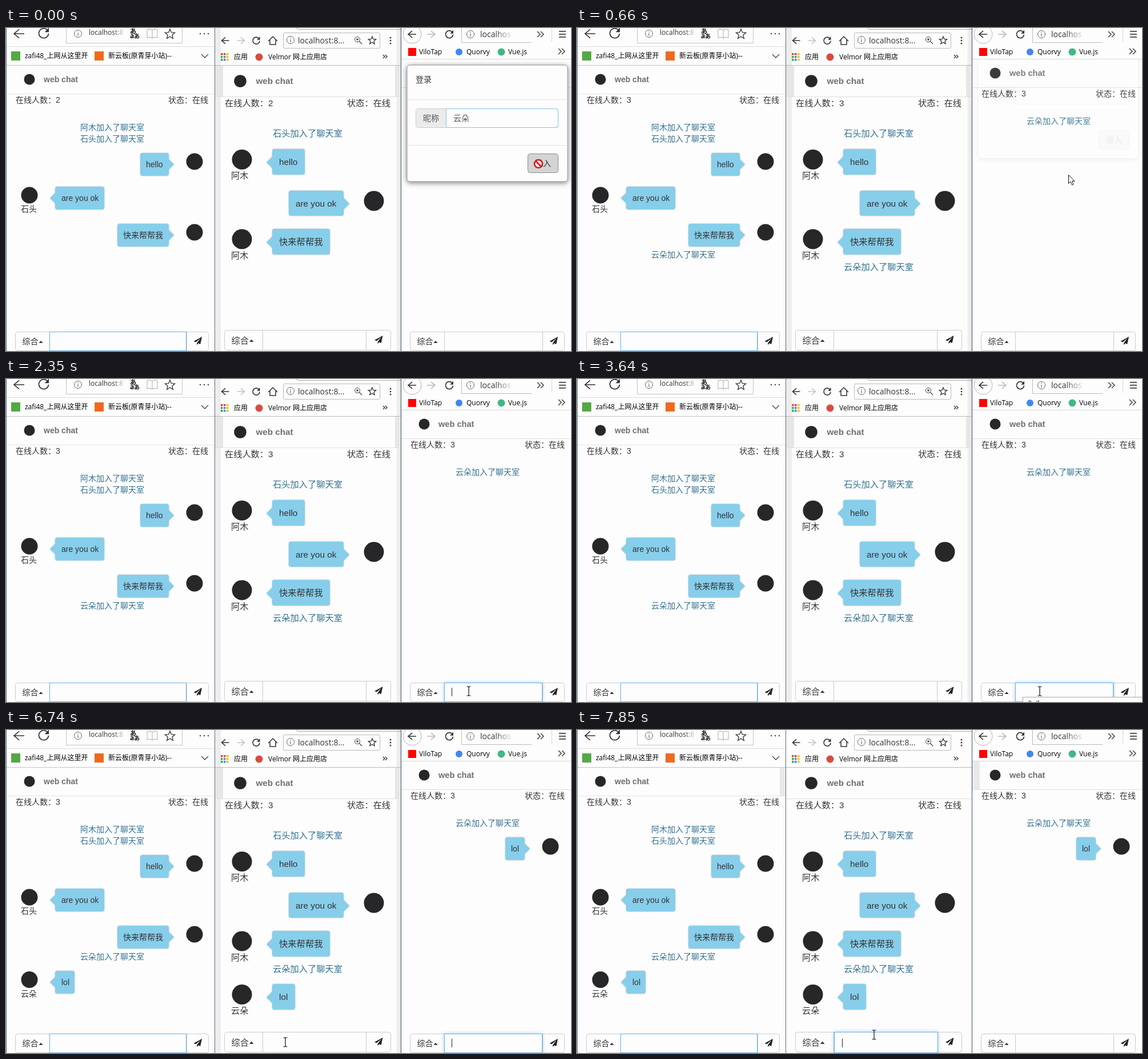
Recreate the animation shown at these times as an HTML page. Size 989 by 566 pixels, loop 8000 ms.

```html
<!DOCTYPE html>
<html lang="zh-CN">
<head>
<meta charset="utf-8">
<title>web chat</title>
<style>
  html, body { margin: 0; width: 100%; height: 100%; overflow: hidden; background: #fdfdfd; }
  svg { display: block; width: 100%; height: 100%; }
  text { font-family: "Liberation Sans", "Noto Sans CJK SC", "Noto Sans CJK", sans-serif; white-space: pre; }
  .ui text { font-family: "Open Sans", "Noto Sans CJK SC", "Noto Sans CJK", sans-serif; }
  .bubble { filter: drop-shadow(0 .5px 1.2px rgba(0,0,0,.28)); }
  .glow { filter: drop-shadow(0 0 3px rgba(102,175,233,.6)); }
  .card { filter: drop-shadow(0 2px 5px rgba(0,0,0,.5)); }
</style>
</head>
<body>
<svg id="stage" viewBox="0 0 989 566">
  <defs>
    <linearGradient id="fade"><stop stop-color="#fdfdfd" stop-opacity="0"/><stop offset="1" stop-color="#fdfdfd"/></linearGradient>
    <linearGradient id="shade"><stop stop-color="#f6f6f6"/><stop offset="1" stop-color="#e2e2e2"/></linearGradient>
    <clipPath id="page"><rect x="692" y="55" width="297" height="511"/></clipPath>
    <clipPath id="tab"><rect x="0" y="34" width="144" height="31"/></clipPath>
  </defs>
</svg>
<script>
const LOOP = 8000;
const INK = '#333', PALE = '#fdfdfd', BLUE = '#66afe9';
const USER = { first: '阿木', second: '石头', third: '云朵' };

// Drawing helpers; all return SVG markup.
const text = (x, y, s, size = 14, fill = INK, extra = '') =>
  `<text x="${x}" y="${y}" font-size="${size}" fill="${fill}" ${extra}>${s}</text>`;
const rect = (x1, y1, x2, y2, fill, stroke = 'none', r = 0, extra = '') =>
  `<rect x="${x1}" y="${y1}" width="${x2 - x1}" height="${y2 - y1}" rx="${r}" fill="${fill}" stroke="${stroke}" ${extra}/>`;
const path = (d, stroke = INK, width = 1.5, fill = 'none') =>
  `<path d="${d}" stroke="${stroke}" stroke-width="${width}" fill="${fill}"/>`;
const disc = (x, y, r, fill = '#272729', stroke = 'none', extra = '') =>
  `<circle cx="${x}" cy="${y}" r="${r}" fill="${fill}" stroke="${stroke}" ${extra}/>`;
const at = (x, y, s) => `<g transform="translate(${x} ${y})">${s}</g>`;
const group = (id, s) => `<g id="${id}">${s}</g>`;
const hLine = (x1, x2, y, color) => rect(x1, y, x2, y + 1, color);
const vLine = (x, color, y1 = 0, y2 = 566) => rect(x, y1, x + 1, y2, color);
const bookmark = (x, y, s) => text(x, y, s, 12, '#000');

// Browser icons
const arrow = (x, y, size, color = INK, dir = 1) =>
  at(x, y, path(`M${dir * size} 0H${-dir * size}M0 ${-size * .85}L${-dir * size} 0L0 ${size * .85}`, color, 1.6));
const reload = (x, y, r) =>
  at(x, y, path(`M${r * .7} ${-r * .7}A${r} ${r} 0 1 0 ${r} ${r * .1}`, INK, 1.7) +
    path(`M${r + .5} ${-r - 1}V${-r * .2}H${r * .2}Z`, 'none', 0, INK));
const info = (x, y) => disc(x, y, 6.5, 'none', '#666') + vLine(x - .5, '#555', y - 1, y + 4) + vLine(x - .5, '#555', y - 4, y - 2.5);
const star = (x, y, r) => {
  const points = Array.from({ length: 10 }, (_, i) => {
    const a = i * Math.PI / 5 - Math.PI / 2, d = i % 2 ? r * .45 : r;
    return `${d * Math.cos(a)} ${d * Math.sin(a)}`;
  });
  return at(x, y, path(`M${points.join('L')}Z`, INK, 1.3));
};
const dots = (x, y, dx, dy, r = 1.5) => [-1, 0, 1].map(i => disc(x + i * dx, y + i * dy, r, '#444')).join('');
const guillemet = (x, y, s) => at(x, y, path(`M${-s} ${-s}L0 0L${-s} ${s}M1 ${-s}L${s + 1} 0L1 ${s}`, '#444', 1.5));

// Chat parts
function bubble(x1, y1, x2, y2, side, label, size, pad) {
  const mid = (y1 + y2) / 2, edge = side < 0 ? x1 + 1 : x2 - 1;
  const h = size > 14 ? 11 : 10, tip = edge + side * h, tipY = size > 14 ? mid + 1 : mid;
  return `<g class="bubble">${rect(x1, y1, x2, y2, '#87ceeb', 'none', 4)}` +
    path(`M${edge} ${tipY - h}L${tip} ${tipY}L${edge} ${tipY + h}Z`, 'none', 0, '#87ceeb') + '</g>' +
    text(x1 + pad, mid + size * .36, label, size);
}
const avatar = (x, y, r, name = '', size = 14) =>
  disc(x, y, r) + text(x - size * (size > 14 ? 1.25 : 1.07), y + r + size * 1.06, name, size);
const notice = (x, y, name, size = 14) => text(x, y, name + '加入了聊天室', size, '#31708f');
const header = (x, y, r, textX, size) => disc(x, y, r) + text(textX, y + 5, 'web chat', size, '#6f6f6f', 'font-weight="bold"');
const status = (x1, x2, y, size) =>
  text(x1, y, '在线人数：<tspan class="count">2</tspan>', size) + text(x2, y, '状态：在线', size, INK, 'text-anchor="end"');

function inputBar(x1, x2, x3, x4, y1, y2, size) {
  const mid = (y1 + y2) / 2, label = x1 + 12.5, tri = label + size * 2 + 1, s = size / 14;
  return rect(x1 + .5, y1 + .5, x4 - .5, y2 - .5, PALE, '#ccc', 4) + vLine(x2, '#ccc', y1, y2) + vLine(x3, '#ccc', y1, y2) +
    text(label, mid + size * .37, '综合', size) +
    path(`M${tri} ${mid + 3}l${3.5 * s} ${-4 * s}l${3.5 * s} ${4 * s}Z`, 'none', 0, INK) +
    at((x3 + x4) / 2, mid - 1, path('M7.5-7L-7 1L-3.2 2.6L5-4.5L-1.4 4V7.5L1 4.5L4.7 6Z', 'none', 0, '#222'));
}
const focusBox = (x1, y1, x2, y2, extra = 'class="glow"') => rect(x1 + .5, y1 + .5, x2 - .5, y2 - .5, PALE, BLUE, 0, extra);
const caret = (id, x) => group(id, vLine(x, '#222', 541, 556));

const leftWindow =
  `<g class="ui">${arrow(23, 10, 9)}${reload(66, 9, 8.5)}` +
  path('M105.5 0V26.5H308.5V0', '#c4c4c4', 1) + info(126, 10) + text(145, 12, 'localhost:8', 12) +
  rect(188, 0, 209, 20, 'url(#fade)') +
  text(217, 10, 'あ', 11, '#111', 'font-weight="bold"') + text(224, 18, 'あ', 10, '#111', 'font-weight="bold"') +
  text(217, 18, 'a', 12, '#111', 'font-weight="bold"') +
  path('M256 4V18M247 3Q253 1 256 4Q259 1 265 3V17Q259 15 256 18Q253 15 247 17Z', '#bbb', 1.2) +
  star(287, 11, 9) + dots(347, 10, 7, 0, 1.2) +
  hLine(0, 365, 32, '#dedede') + hLine(0, 365, 65, '#c3c3c3') +
  rect(9, 41, 25, 57, '#55a845') + `<g clip-path="url(#tab)">${bookmark(33, 53, 'zafi48_上网从这里开始')}</g>` +
  rect(155, 41, 171, 57, '#ee6a1f') + bookmark(179, 53, '新云板(原青芽小站)--') +
  path('M342 46L348 52L354 46', '#444', 1.3) + '</g>' +
  header(41, 90, 9.5, 66, 14) + hLine(1, 365, 115, '#e4e4e4') + status(17, 354, 131, 14) +
  notice(130, 179, USER.first) + notice(130, 199, USER.second) +
  bubble(235, 219, 285, 259, 1, 'hello', 14, 10) + avatar(330, 234, 14.5) +
  bubble(86, 278, 172, 318, -1, 'are you ok', 14, 11) + avatar(41, 293, 14.5, USER.second) +
  bubble(195, 343, 285, 383, 1, '快来帮帮我', 14, 10) + avatar(330, 358, 14.5) +
  inputBar(16, 76, 316, 355, 532, 566, 14) + focusBox(76, 532, 316, 566, '');

const APP_COLORS = ['#e94335', '#e94335', '#fbbc05', '#34a853', '#4285f4', '#fbbc05', '#34a853', '#4285f4', '#fbbc05'];
const appGrid = APP_COLORS.map((c, i) => at(376 + i % 3 * 5, 44 + Math.floor(i / 3) * 5, rect(0, 0, 3.5, 3.5, c))).join('');
const middleWindow =
  `<g class="ui">${path('M508 0L511 2.5H691', '#aaa', 1)}` +
  arrow(384, 22, 6.5) + arrow(411, 22, 6.5, '#c4c4c4', -1) + reload(438, 22, 6) +
  path('M459 23L467 15L475 23M462 21V29H472V21', INK, 1.5) +
  rect(485.5, 8.5, 654.5, 35.5, PALE, '#b8b8b8', 2) + info(498, 21) + text(511, 27, 'localhost:8...', 14) +
  disc(615, 20, 4.5, 'none', '#444') + path('M618 23L623 28M613 20H617M615 18V22', '#444', 1.3) +
  star(641, 22, 7) + dots(673, 22, 0, 5) + appGrid + bookmark(399, 55, '应用') +
  disc(443, 51, 6.5, '#d94b3d') + bookmark(459, 55, 'Velmor 网上应用店') + guillemet(663, 50, 3) +
  hLine(366, 691, 65, '#b9b9b9') + '</g>' +
  header(410, 93, 10.8, 437.5, 15.2) + hLine(366, 691, 120, '#e0e0e0') + status(383, 673, 137, 15.2) +
  notice(467, 190, USER.second, 15.25) +
  bubble(466, 212, 523, 257, -1, 'hello', 15.3, 12) + avatar(413, 230.5, 17.5, USER.first, 15.2) +
  bubble(495, 285, 591, 329, 1, 'are you ok', 15.3, 12) + avatar(644, 303, 17.5) +
  bubble(466, 352, 567, 397, -1, '快来帮帮我', 15.3, 12) + avatar(413, 370, 17.5, USER.first, 15.2) +
  inputBar(382, 449, 630, 674, 529, 565, 15.2) + group('middleFocus', focusBox(450, 529, 632, 566)) + caret('middleCaret', 464);

const rightWindow =
  `<g class="ui">${disc(711, 11, 16, PALE, '#b5b5b5')}${arrow(711, 11, 7)}${arrow(744, 11, 7, '#b9b9b9', -1)}${reload(776, 11, 6.5)}` +
  path('M797.5 0V25.5H920', '#bbb', 1) + info(813, 11) + text(830, 16, 'localhos', 14) + rect(855, 2, 889, 24, 'url(#fade)') +
  guillemet(935, 11, 5) + vLine(955, '#d5d5d5', 0, 24) + [5, 10, 15].map(y => rect(968, y, 980, y + 1.6, INK)).join('') +
  rect(704, 35, 718, 49, '#f00') + bookmark(723, 46, 'ViloTap') +
  disc(793, 42, 6, '#4285f4') + bookmark(806, 46, 'Quorvy') +
  disc(867, 42, 6.5, '#41b883') + bookmark(879, 46, 'Vue.js') + guillemet(972, 41, 5) +
  hLine(692, 989, 54, '#d8d8d8') + '</g>' +
  header(732, 79, 9.5, 757, 14.6) + hLine(692, 989, 104, '#e0e0e0') + status(708, 978, 120, 14) + notice(787, 168, USER.third) +
  inputBar(707, 767, 939, 978, 532, 566, 14) + group('rightFocus', focusBox(767, 532, 939, 566)) + caret('rightCaret', 780) +
  group('candidates', rect(780.5, 557.5, 1000, 580, PALE, '#aaa') + text(790, 574, '<tspan id="typed"></tspan>', 14));

const dialog = `<g clip-path="url(#page)"><g id="dialog">
  <g class="card">${rect(702, 65, 983, 269, PALE, '#999', 5)}</g>` +
  text(717, 95, '登录') + hLine(702, 983, 125, '#e2e2e2') + hLine(702, 983, 205, '#e2e2e2') +
  rect(717.5, 141.5, 966.5, 174.5, PALE, '#ccc', 4) + rect(718, 142, 770, 174, '#ebebeb', 'none', 3) +
  vLine(770, '#ccc', 141, 174) + text(730, 163, '昵称', 14, '#555') +
  group('nickname', path('M770.5 141.5H963Q966.5 141.5 966.5 145V171Q966.5 174.5 963 174.5H770.5Z', '#8fbfe6', 1) + text(783, 163, USER.third, 14, '#555')) +
  rect(913.5, 220.5, 966.5, 253.5, '#e6e6e6', '#adadad', 4, 'id="enter"') + text(926, 242, '进入') + '</g></g>';

const joined = notice(130, 402, USER.third) + notice(467, 424, USER.third, 15.25);
const reply =
  bubble(86, 422, 120, 462, -1, 'lol', 14, 11) + avatar(41, 437.5, 14.5, USER.third) +
  bubble(466, 445, 506, 490, -1, 'lol', 15.3, 12) + avatar(413, 463.5, 17.5, USER.third, 15.2) +
  bubble(874, 188, 908, 228, 1, 'lol', 14, 10) + avatar(953, 204, 14.5);

// Window shadows depend on which window is in front.
const rightInFront = rect(366, 0, 376, 566, '#ededed') + rect(683, 0, 691, 566, 'url(#shade)') +
  rect(366, 66, 380, 120, '#e6e6e6') + rect(681, 66, 691, 120, '#e6e6e6');
const middleInFront = rect(355, 66, 365, 115, '#e9e9e9') + rect(692, 55, 705, 104, '#e9e9e9');

const pointers =
  group('blocked', disc(932, 238, 7, '#fff', '#d8141c', 'stroke-width="2.6"') + path('M927 233L937 243', '#d8141c', 2.6)) +
  group('pointer', path('M.5 .5V15.5L4 12.3L6.5 18L9 17L6.6 11.5H11Z', '#111', 1, '#fff')) +
  group('beam', path('M-3.5-8H-1L0-7L1-8H3.5M0-7V7M-3.5 8H-1L0 7L1 8H3.5', '#111', 1.2));

const stage = document.getElementById('stage');
stage.innerHTML += rect(0, 0, 989, 566, PALE) + group('rightInFront', rightInFront) + group('middleInFront', middleInFront) +
  leftWindow + middleWindow + rightWindow + group('joined', joined) + group('reply', reply) +
  vLine(0, '#57738c') + vLine(365, '#5d6f80') + vLine(691, '#3f5468') + dialog + pointers;

const el = id => document.getElementById(id);
const show = (id, visible) => el(id).setAttribute('visibility', visible ? 'visible' : 'hidden');
const clamp = v => Math.max(0, Math.min(1, v));
const counts = stage.querySelectorAll('.count');

// Pointer keys: time, x, y
const POINTER = [
  [140, 932, 238], [380, 860, 257], [1100, 860, 257], [1520, 869, 473], [1950, 812, 545], [2220, 808, 548],
  [2350, 810, 547], [4850, 810, 547], [5230, 489, 555], [6100, 489, 555], [6210, 489, 547],
  [6900, 489, 547], [7600, 518, 545], [7850, 520, 534]
];
const RIGHT_BLINK = [2080, 2660, 3200, 3640, 3940, 4250, 4660, 5190, 5720, 6210, 6740, 6850];
const MIDDLE_BLINK = [6850, 7330, 7850];
const lit = (toggles, t) => toggles.filter(v => v <= t).length % 2 === 1;

function pointerAt(t) {
  const i = POINTER.findIndex(k => k[0] > t);
  if (i < 1) return (i ? POINTER.at(-1) : POINTER[0]).slice(1);
  const a = POINTER[i - 1], b = POINTER[i], p = (t - a[0]) / (b[0] - a[0]);
  return [a[1] + (b[1] - a[1]) * p, a[2] + (b[2] - a[2]) * p];
}

function render(t) {
  const hasJoined = t >= 240, middleActive = t >= 6850, leaving = clamp((t - 300) / 400);
  counts.forEach(c => { c.textContent = hasJoined ? 3 : 2; });
  show('joined', hasJoined);
  show('reply', t >= 3940);
  show('nickname', !hasJoined);
  el('enter').setAttribute('fill', t < 140 ? '#d4d4d4' : '#e6e6e6');
  el('enter').setAttribute('stroke', t < 140 ? '#8c8c8c' : '#adadad');
  el('dialog').setAttribute('transform', `translate(0 ${-45 * leaving})`);
  el('dialog').setAttribute('opacity', 1 - leaving);

  show('rightInFront', !middleActive);
  show('middleInFront', middleActive);
  show('middleFocus', middleActive);
  show('rightFocus', t >= 1950 && !middleActive);
  show('rightCaret', lit(RIGHT_BLINK, t));
  show('middleCaret', lit(MIDDLE_BLINK, t));
  show('candidates', t >= 2660 && t < 3940);
  el('typed').textContent = "l'o'l".slice(0, 1 + 2 * Math.floor(Math.max(0, t - 2660) / 200));

  const [x, y] = pointerAt(t);
  const overInput = y > 530 && (x < 632 || x > 767);
  show('blocked', t < 140);
  show('pointer', t >= 140 && !overInput);
  show('beam', overInput);
  for (const id of ['pointer', 'beam']) el(id).setAttribute('transform', `translate(${x} ${y})`);
}

const start = performance.now();
function tick() {
  render((performance.now() - start) % LOOP);
  requestAnimationFrame(tick);
}
tick();
</script>
</body>
</html>
```
